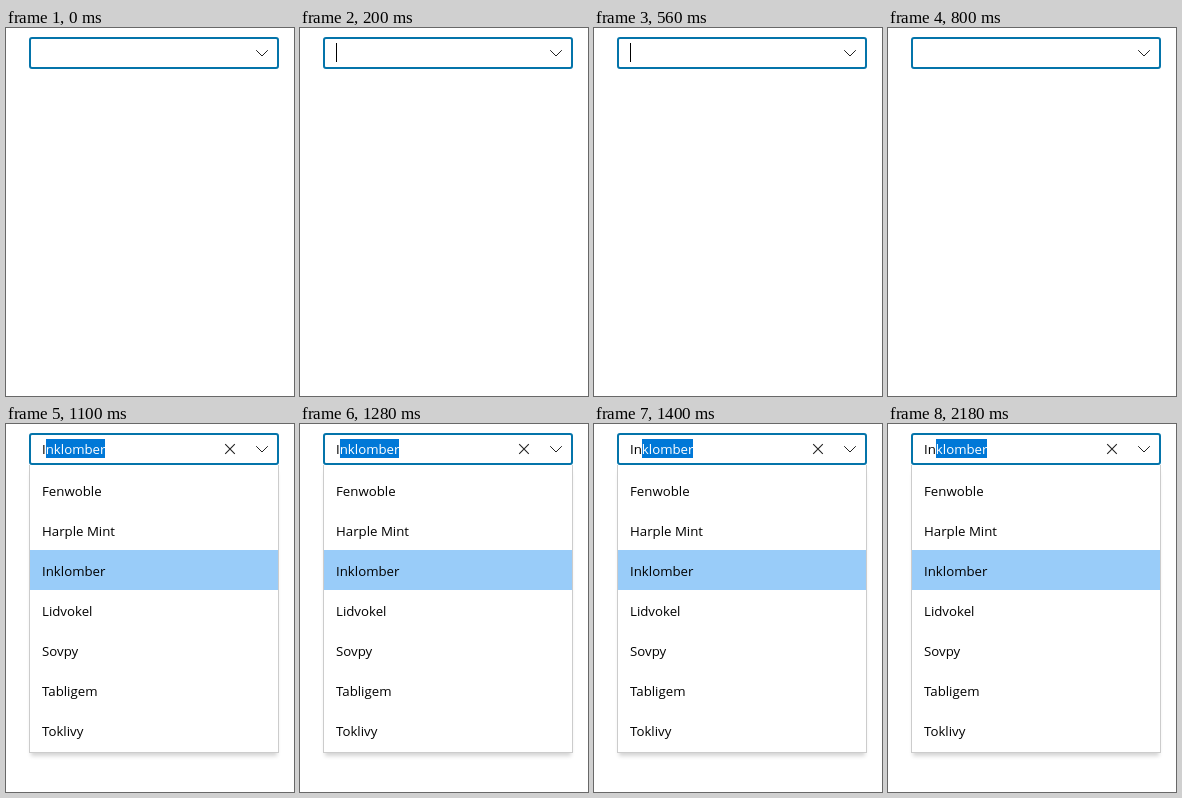
An HTML page for the animation above (2.7 s loop, 288 px wide and 368 px high).

```html
<!DOCTYPE html>
<html lang="en">
<head>
<meta charset="utf-8">
<title>Combo box with completion</title>
<style>
  html, body { margin: 0; width: 100%; height: 100%; overflow: hidden; background: #fff; }
  div { position: absolute; box-sizing: border-box; }
  #field {
    left: 23px; top: 9px; width: 250px; height: 32px;
    border: 2px solid #0474aa; border-radius: 3px; background: #fff;
  }
  #list {
    left: 23px; top: 41px; width: 250px; height: 288px;
    border: 1px solid #ccc; border-top: 0; background: #fff;
    box-shadow: 0 5px 4px -2px rgba(0, 0, 0, .17);
  }
  #current { left: 24px; top: 126px; width: 248px; height: 40px; background: #99ccf9; }
  svg { position: absolute; left: 0; top: 0; }
  text { font: 13.25px "Open Sans", "Noto Sans", sans-serif; fill: #000; }
  #rest { fill: #fff; }
  path { fill: none; stroke: #222; }
</style>
</head>
<body>
<div id="field"></div>
<div id="list"></div>
<div id="current"></div>
<svg width="288" height="368" viewBox="0 0 288 368">
  <rect id="caret" x="36" y="15" width="1" height="19"/>
  <g id="entry">
    <rect id="mark" y="15" height="19" fill="#0078d7"/>
    <text x="36" y="30"><tspan id="typed"></tspan><tspan id="rest"></tspan></text>
  </g>
  <g id="options"></g>
  <path id="clear" d="M219.2 20.2l9.6 9.6m0-9.6l-9.6 9.6" stroke-width="1.1"/>
  <path d="M250.2 22.2l5.8 5.8 5.8-5.8"/>
</svg>
<script>
  const LOOP = 2700;
  const WORD = "Inklomber";
  const OPTIONS = ["Fenwoble", "Harple Mint", WORD, "Lidvokel", "Sovpy", "Tabligem", "Toklivy"];
  const MARK_END = 99;
  const MARK_START = [36, 40, 48];

  const STEPS = [
    { at: 0, caret: false, typed: 0, clear: false },
    { at: 200, caret: true, typed: 0, clear: false },
    { at: 800, caret: false, typed: 0, clear: false },
    { at: 1000, caret: false, typed: 1, clear: false },
    { at: 1100, caret: false, typed: 1, clear: true },
    { at: 1400, caret: false, typed: 2, clear: true }
  ];

  const el = id => document.getElementById(id);
  const show = (id, on) => { el(id).style.visibility = on ? "visible" : "hidden"; };

  OPTIONS.forEach((name, i) => {
    const label = document.createElementNS("http://www.w3.org/2000/svg", "text");
    label.setAttribute("x", 36);
    label.setAttribute("y", 72 + 40 * i);
    label.textContent = name;
    el("options").append(label);
  });

  let shown = null;

  function render(step) {
    const open = step.typed > 0;
    const start = MARK_START[step.typed];
    ["list", "current", "options", "entry"].forEach(id => show(id, open));
    show("caret", step.caret);
    show("clear", step.clear);
    el("typed").textContent = WORD.slice(0, step.typed);
    el("rest").textContent = WORD.slice(step.typed);
    el("mark").setAttribute("x", start);
    el("mark").setAttribute("width", MARK_END - start);
  }

  function tick() {
    const t = performance.now() % LOOP;
    const step = STEPS.findLast(s => s.at <= t);
    if (step !== shown) render(shown = step);
    requestAnimationFrame(tick);
  }
  tick();
</script>
</body>
</html>
```
